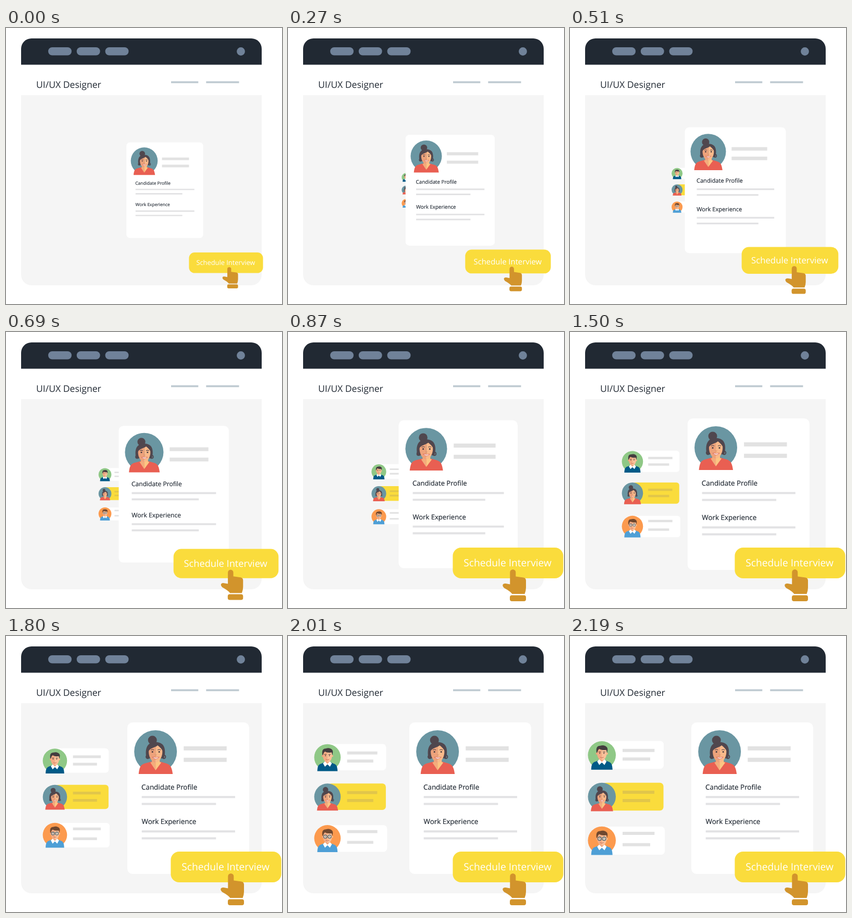
Animation of 530 by 530 pixels, one loop 3.6 s. Source, as an HTML page:

```html
<!DOCTYPE html>
<html lang="en">
<head>
<meta charset="utf-8">
<title>Candidate shortlist</title>
<style>
  html, body { margin: 0; width: 100%; height: 100%; overflow: hidden; background: #fff; }
  svg { display: block; width: 100vw; height: 100vh; }
  text { font-family: "Open Sans", "Noto Sans", sans-serif; fill: #212933; text-rendering: geometricPrecision; }
</style>
</head>
<body>
<svg viewBox="0 0 530 530">
  <defs>
    <g id="woman">
      <circle r="41" fill="#6a96a2"/>
      <circle cx="-6" cy="-22" r="8.5" fill="#50474e"/>
      <path d="M-17 13C-20 4-19-8-14-13C-8-20 8-20 14-13C19-7 19 4 16 13Z" fill="#50474e"/>
      <g fill="none" stroke="#50474e" stroke-width="2">
        <circle cx="-15" cy="10" r="3.2"/><circle cx="16" cy="10" r="3.2"/>
      </g>
      <path d="M-32.5 43C-31 30-29 25-20 22.500L-7 19H8L20 22.500C29 25 31 30 33 43Z" fill="#e95f52"/>
      <path d="M-7 12V20L-10 21L0 36V12Z" fill="#f3ac7c"/>
      <path d="M8 12V20L11 21L0 36V12Z" fill="#fcc583"/>
      <path d="M0-14C-10-13-14-7-13 3C-12 13-6 21 0 21Z" fill="#eda27b"/>
      <path d="M0-14C10-13 14-7 13 3C12 13 6 21 0 21Z" fill="#f9b98a"/>
      <path d="M-15 2C-15-14-6-17 1-16C9-17 15-11 15 2C13-4 9-8 4-12C-2-7-11-8-15 2Z" fill="#50474e"/>
      <path d="M-9-3Q-6-5-3-3M4-3Q7-5 10-3" fill="none" stroke="#50474e" stroke-width="1.200"/>
      <circle cx="-6" cy=".5" r="1.600" fill="#463b40"/><circle cx="7" cy=".5" r="1.600" fill="#463b40"/>
      <path d="M-1.500 6Q.5 8 2.500 6" fill="none" stroke="#d98465"/>
      <path d="M-6 10.500Q.5 12 7 10.500Q.5 17.500-6 10.500Z" fill="#fff" stroke="#d9564c" stroke-width=".8"/>
    </g>
    <g id="manFace">
      <path d="M-20.500 28C-20 17-18 14-11 12L-5 9H5L11 12C18 14 20 17 20.500 28Z" fill="currentColor"/>
      <path d="M-5 5H5V10L0 15L-5 10Z" fill="#eda27b"/>
      <path d="M-5 8L0 13L5 8L9 12L5 19L0 14L-5 19L-9 12Z" fill="#fff"/>
      <circle cx="-9.500" cy="-3" r="2.200" fill="#eda27b"/><circle cx="9.500" cy="-3" r="2.200" fill="#f9b98a"/>
      <path d="M0-14H-9V-2C-9 5-4 10 0 10Z" fill="#f3ac85"/>
      <path d="M0-14H9V-2C9 5 4 10 0 10Z" fill="#fbc19a"/>
      <path d="M-6.500-6H-2M2-6H6.500" stroke="#4b3d39"/>
      <circle cx="-4" cy="-3.500" r="1" fill="#40383a"/><circle cx="4" cy="-3.500" r="1" fill="#40383a"/>
      <path d="M-3.500 4Q0 6.500 3.500 4" fill="none" stroke="#c96f58"/>
    </g>
    <path id="manHair" d="M-10-4C-12-14-9-18-3-18C2-20 11-18 11-11L10-4L8.500-10C3-9-2-10-5-12Q-8-10-8.500-6Z"/>
  </defs>

  <path d="M29 129H491V474a20 20 0 0 1-20 20H49a20 20 0 0 1-20-20Z" fill="#f5f5f5"/>
  <path d="M29 70.500V40a20 20 0 0 1 20-20H471a20 20 0 0 1 20 20V70.500Z" fill="#212933"/>
  <g fill="#708299">
    <rect x="81" y="37" width="45" height="15.500" rx="7.750"/>
    <rect x="135.700" y="37" width="45" height="15.500" rx="7.750"/>
    <rect x="190.500" y="37" width="45" height="15.500" rx="7.750"/>
    <circle cx="451" cy="45" r="7.900"/>
  </g>
  <path d="M317 104.200H369.300M384.300 104.200H447.500" stroke="#c1ccd3" stroke-width="3.800"/>
  <text x="58" y="115" font-size="17.600">UI/UX Designer</text>

  <g id="rows">
    <rect x="62" y="201.500" width="118" height="53.500" rx="7" fill="#fff"/>
    <rect x="62" y="281.700" width="117.500" height="53.500" rx="7" fill="#fadc3c"/>
    <rect x="62" y="366" width="120" height="54" rx="7" fill="#fff"/>
    <path d="M101 219.800H162.300M101 236.200H154M101 379H162.300M101 400.800H154" stroke="#e2e2e2" stroke-width="6"/>
    <path d="M101 300H162M101 316H154" stroke="#e1c64a" stroke-width="6"/>
    <g transform="translate(61.200 228.700)" color="#005a87">
      <circle r="26.800" fill="#8fc886"/>
      <use href="#manFace"/><use href="#manHair" fill="#443d3f"/>
    </g>
    <use href="#woman" transform="translate(61.200 308.500) scale(.653)"/>
    <g transform="translate(61.200 392.500)" color="#4e9fd6">
      <circle r="26.800" fill="#fc9a4e"/>
      <use href="#manFace"/><use href="#manHair" fill="#70482f"/>
      <g fill="#d5e6e8" fill-opacity=".5" stroke="#47606a" stroke-width="1.200">
        <circle cx="-4.300" cy="-3.300" r="3.400"/><circle cx="4.300" cy="-3.300" r="3.400"/>
      </g>
    </g>
  </g>

  <g id="card">
    <rect x="233" y="166" width="234" height="291" rx="10" fill="#fff"/>
    <use href="#woman" transform="translate(287.200 222)"/>
    <path d="M341.300 215.800H423.700M341.300 237.800H423.700" stroke="#e2e2e2" stroke-width="8"/>
    <path d="M260.700 309.200H440M260.700 322.400H403.300M260.700 375.200H440M260.700 388.400H403.300" stroke="#e2e2e4" stroke-width="4"/>
    <g font-size="13.400" stroke="#212933" stroke-width=".2">
      <text x="260" y="294.500">Candidate Profile</text>
      <text x="260.500" y="360.700">Work Experience</text>
    </g>
  </g>

  <g id="action">
    <rect x="316.400" y="414" width="212.200" height="59" rx="16" fill="#fadc3c"/>
    <text x="337.300" y="450.300" font-size="19.200" style="fill:#fff">Schedule Interview</text>
    <g fill="#d2942c">
      <path d="M426.300 461.500a5.500 5.500 0 0 1 11 0V469.500L452 471.500Q457 472.500 457 477.500V491Q457 497 454.500 503H430.500Q427 498 415 491.500Q411.500 488 412.500 485Q414 482.500 418 483L426.300 484.500Z"/>
      <rect x="426" y="505.500" width="31" height="11.500" rx="4"/>
    </g>
  </g>
</svg>
<script>
const LOOP = 3600, STEP = 30, START = 20;
const [rows, card, action] = ["rows", "card", "action"].map(id => document.getElementById(id));

// Linear move that begins at START and reaches its goal at `end`.
const ramp = (t, from, to, end) =>
  from + (to - from) * Math.min(1, Math.max(0, (t - START) / (end - START)));

// Scales a part about its pivot and places that pivot at (x, y).
const place = (part, x, y, scale, pivotX, pivotY) =>
  part.setAttribute("transform",
    `translate(${x} ${y}) scale(${scale}) translate(${-pivotX} ${-pivotY})`);

function draw(t) {
  place(rows, ramp(t, 258, 108, 2185), ramp(t, 311.3, 308.5, 2185), ramp(t, .212, 1, 2150), 108, 308.5);
  place(card, ramp(t, 305, 350, 1780), 311.5, ramp(t, .63, 1, 929), 350, 311.5);
  place(action, 422.4, 465.5, ramp(t, .67, 1, 809), 422.4, 465.5);
}

const origin = performance.now();
function tick() {
  const t = (performance.now() - origin) % LOOP;
  draw(Math.floor(t / STEP) * STEP);
  requestAnimationFrame(tick);
}
tick();
</script>
</body>
</html>
```
